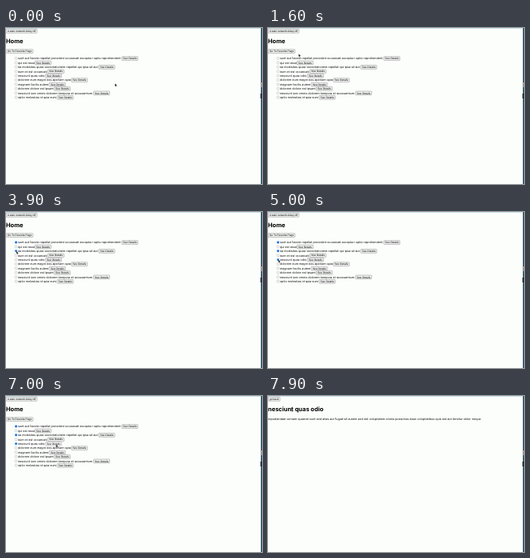
Animation, 320 px wide and 195 px high, one loop 8000 ms. Source, as an HTML page:

```html
<!DOCTYPE html>
<html lang="en">
<head>
<meta charset="utf-8">
<title>Favorites list</title>
<style>
  html, body { margin: 0; width: 100%; height: 100%; overflow: hidden; background: #fcfefc; }
  svg { display: block; width: 100vw; height: 100vh; }
  text { font: 3.73px Inter, "Open Sans", sans-serif; fill: #111; text-rendering: geometricPrecision; }
  .title { font-size: 7.5px; font-weight: 700; fill: #000; }
  .body { font-size: 3.77px; }
  .button rect { fill: #efefef; stroke: #767676; stroke-width: .4; }
  .button text { font: 3.33px "Liberation Sans", Arial, sans-serif; fill: #000; text-anchor: middle; }
  .button.hover rect { fill: #e2e2e2; stroke: #555; }
  .button.pressed rect { fill: #f5f5f5; stroke: #8a8a8a; }
  .box { fill: #fff; stroke: #858585; stroke-width: .35; }
  .box.pressed { fill: #ddd; stroke: #555; }
  .box.checked { fill: #1f78e6; stroke: none; }
</style>
</head>
<body>
<svg id="stage" viewBox="0 0 320 195">
  <rect width="320" height="195" fill="#fcfefc"/>
  <rect width="320" height="1" fill="#c9e3ea"/>
  <g id="list"></g>
  <g id="detail"></g>
  <g id="edge">
    <rect x="318" width="1" height="195" fill="#a3c6d6"/>
    <rect x="319" width="1" height="195" fill="#1d3442"/>
    <rect x="319" y="68" width="1" height="6" fill="#a98a6a"/>
    <rect x="318" y="82" width="2" height="6" fill="#2a3238"/>
  </g>
  <path id="arrow" d="M0 0V3.7L.9 2.9L1.5 4.2L2.1 3.9L1.6 2.7H2.7Z" fill="#000" stroke="#fff" stroke-width=".25"/>
  <path id="beam" d="M-.8 0Q0 0 0 .6Q0 0 .8 0M0 .5V3.7M-.8 4.2Q0 4.2 0 3.6Q0 4.2 .8 4.2" fill="none" stroke="#222" stroke-width=".4"/>
</svg>
<script>
const DURATION = 8000, STEP = 100;
const ROW_TOP = 38.1, ROW_PITCH = 5.41, DETAILS_WIDTH = 20.5;
const $ = id => document.getElementById(id);

// label and left edge of its button
const rows = [
  ["sunt aut facere repellat provident occaecati excepturi optio reprehenderit", 144.6],
  ["qui est esse", 36.1],
  ["ea molestias quasi exercitationem repellat qui ipsa sit aut", 115.7],
  ["eum et est occaecati", 52.2],
  ["nesciunt quas odio", 49.1],
  ["dolorem eum magni eos aperiam quia", 81.4],
  ["magnam facilis autem", 53.9],
  ["dolorem dolore est ipsam", 60.1],
  ["nesciunt iure omnis dolorem tempora et accusantium", 109.3],
  ["optio molestias id quia eum", 63.8]
];

// first changed moment, last changed moment, destination of the pointer
const start = [136.2, 69.3];
const moves = [
  [400, 800, 92.7, 18.7],
  [1200, 1900, 13.2, 38.5],
  [2100, 2200, 13, 38.1],
  [3000, 3600, 13, 48.7],
  [4300, 4900, 13, 59.5],
  [5500, 5900, 82, 61.6],
  [6300, 6800, 62.6, 60.6],
  [7700, 7900, 30, 15.1]
];
const checks = { 0: 2600, 2: 3900, 4: 5000 };
const PRESS_AT = 7000, OPEN_AT = 7100, BEAM_AT = 7900;

function add(parent, tag, attrs, content = "") {
  const node = document.createElementNS("http://www.w3.org/2000/svg", tag);
  for (const key in attrs) node.setAttribute(key, attrs[key]);
  node.textContent = content;
  return parent.appendChild(node);
}

function addButton(parent, x, middle, width, label) {
  const group = add(parent, "g", { class: "button" });
  add(group, "rect", { x: x + .2, y: middle - 2.4, width: width - .4, height: 4.8, rx: .7 });
  add(group, "text", { x: x + width / 2, y: middle + 1.15 }, label);
  return group;
}

const list = $("list"), detail = $("detail");
addButton(list, 0, 3.9, 39, "create network delay off");
add(list, "text", { x: 0, y: 19.3, class: "title" }, "Home");
addButton(list, 0, 29.1, 34, "Go To Favorite Page");

const items = rows.map(([label, buttonX], i) => {
  const middle = ROW_TOP + i * ROW_PITCH;
  const box = add(list, "rect", { x: 11.1, y: middle - 1.6, width: 2.9, height: 2.9, rx: 1.1 });
  add(list, "text", { x: 14.9, y: middle + 1.3 }, label);
  return { box, buttonX, middle, button: addButton(list, buttonX, middle, DETAILS_WIDTH, "See Details") };
});

addButton(detail, 0, 3.9, 15.3, "go back");
add(detail, "text", { x: 0, y: 19.3, class: "title" }, "nesciunt quas odio");
add(detail, "text", { x: 0, y: 30, class: "body" },
  "repudiandae veniam quaerat sunt sed alias aut fugiat sit autem sed est voluptatem omnis " +
  "possimus esse voluptatibus quis est aut tenetur dolor neque");

const ease = p => p * p * (3 - 2 * p);

function pointerAt(t) {
  let [x, y] = start;
  for (const [first, last, toX, toY] of moves) {
    if (t < first) break;
    const begin = first - STEP;
    const p = ease(Math.min(1, (t - begin) / (last - begin)));
    x += (toX - x) * p;
    y += (toY - y) * p;
  }
  return [x, y];
}

function show(node, visible) {
  node.setAttribute("display", visible ? "inline" : "none");
}

function render(time) {
  const t = Math.floor(time % DURATION / STEP) * STEP;
  const [x, y] = pointerAt(t);
  const opened = t >= OPEN_AT;
  show(list, !opened);
  show(detail, opened);

  items.forEach(({ box, button, buttonX, middle }, i) => {
    const state = t >= checks[i] ? "checked" : t >= checks[i] - STEP ? "pressed" : "";
    box.setAttribute("class", "box " + state);
    const over = x > buttonX && x < buttonX + DETAILS_WIDTH && Math.abs(y - middle) < 2.6;
    button.setAttribute("class", "button" + (over ? t >= PRESS_AT ? " pressed" : " hover" : ""));
  });

  const overText = t >= BEAM_AT;
  for (const id of ["arrow", "beam"]) {
    $(id).setAttribute("transform", `translate(${x} ${y})`);
    show($(id), overText === (id === "beam"));
  }
}

const origin = performance.now();
function tick() {
  render(performance.now() - origin);
  requestAnimationFrame(tick);
}
tick();
</script>
</body>
</html>
```
